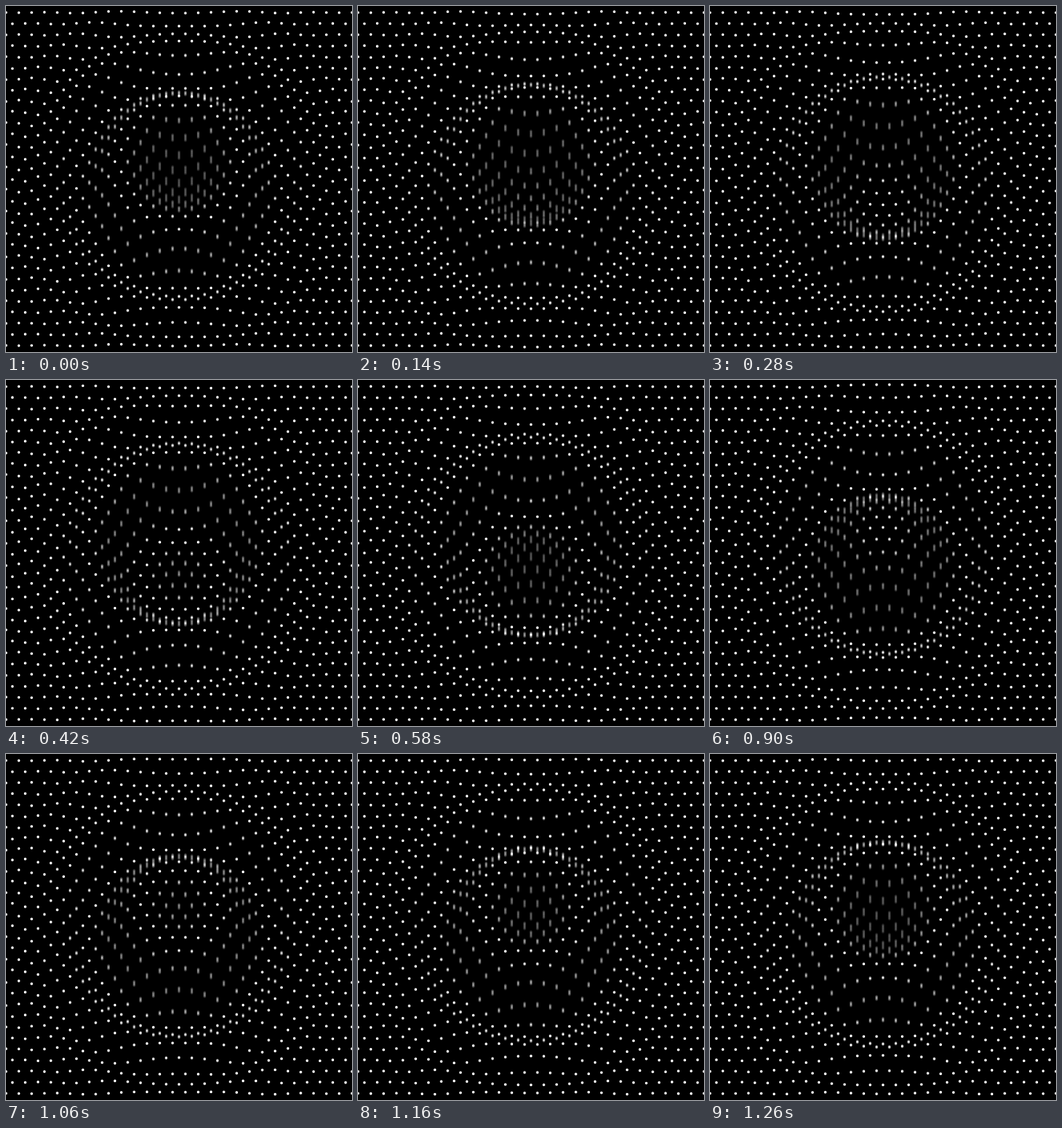
Recreate the animation shown at these times as an HTML page with a canvas. Size 500 by 500 pixels, loop 1280 ms.

```html
<!DOCTYPE html>
<html>
<head>
<meta charset="utf-8">
<title>Ripple lattice</title>
<style>
  html, body { margin: 0; height: 100%; overflow: hidden; background: #000; }
  canvas { display: block; }
</style>
</head>
<body>
<canvas id="stage" width="500" height="500"></canvas>
<script>
const ctx = document.getElementById('stage').getContext('2d');
const TAU = Math.PI * 2;
const LOOP = 1280, STEP = 20;      // ms
const SHUTTER = 64, SAMPLES = 15;  // motion blur: the shutter opens at the drawn time
const SIZE = 500, CENTER = SIZE / 2;
const GAP = SIZE / 27, ROW = GAP * Math.sqrt(3) / 2, RADIUS = 1.9;

// Triangular lattice; each dot keeps its own amplitude and phase (in cycles).
const dots = [];
for (let row = -16; row <= 16; row++) {
  const shift = row % 2 ? 0.5 : 0;
  for (let col = -14; col <= 14; col++) {
    const dx = (col + shift) * GAP, dy = row * ROW;
    const r2 = dx * dx + dy * dy;
    dots.push({
      x: CENTER + dx,
      y: CENTER + dy,
      amp: 37.5 * Math.exp(-r2 / 22000),
      phase: r2 * 3.41e-5 - 0.5
    });
  }
}

function drawSample(time) {
  ctx.beginPath();
  for (const { x, y, amp, phase } of dots) {
    const py = y + amp * Math.sin(TAU * (phase - time / LOOP));
    ctx.moveTo(x + RADIUS, py);
    ctx.arc(x, py, RADIUS, 0, TAU);
  }
  ctx.fill();
}

function draw(time) {
  ctx.globalCompositeOperation = 'source-over';
  ctx.globalAlpha = 1;
  ctx.fillStyle = '#000';
  ctx.fillRect(0, 0, SIZE, SIZE);

  ctx.globalCompositeOperation = 'lighter';
  ctx.globalAlpha = 1 / SAMPLES;
  ctx.fillStyle = '#fff';
  for (let i = 0; i < SAMPLES; i++) {
    drawSample(time + (i + 0.5) / SAMPLES * SHUTTER);
  }
}

let start = null;
function tick() {
  const now = performance.now();
  start ??= now;
  draw(Math.floor((now - start) % LOOP / STEP) * STEP);
  requestAnimationFrame(tick);
}
tick();
</script>
</body>
</html>
```
